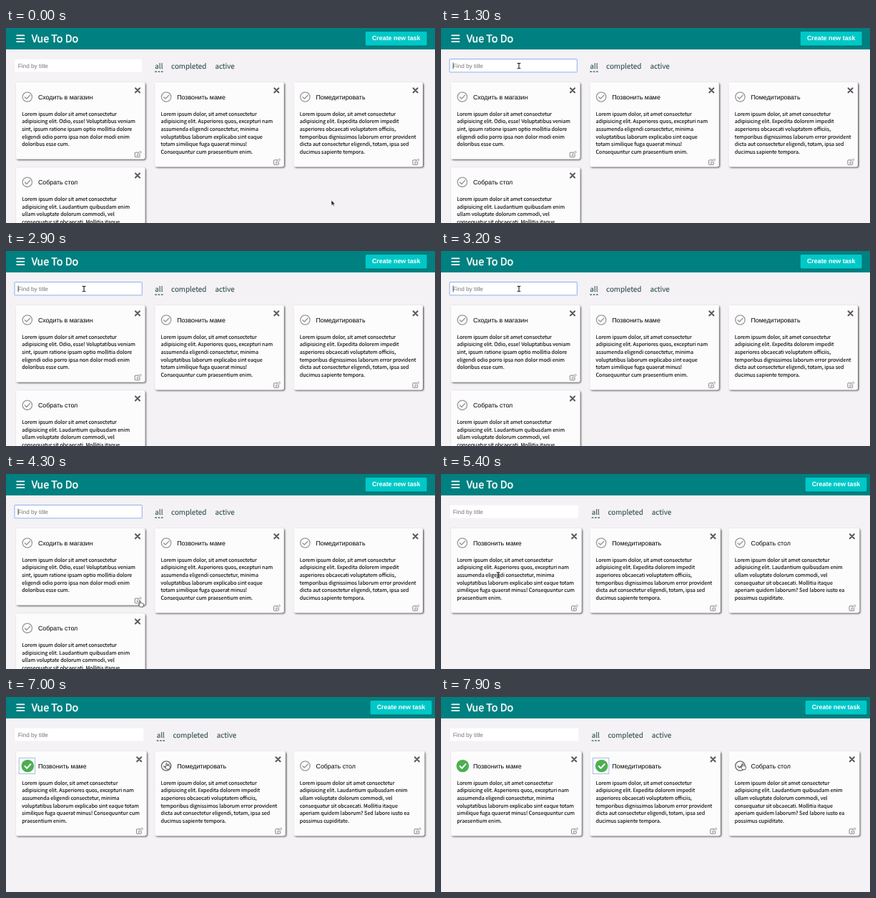
Animation of 600 by 273 pixels, one loop 8 s. Source, as an HTML page:

```html
<!DOCTYPE html>
<html lang="en">
<head>
<meta charset="utf-8">
<title>Vue To Do</title>
<style>
  html, body { margin: 0; width: 100%; height: 100%; overflow: hidden; background: #f4f2f5; }
  svg { display: block; width: 100vw; height: 100vh; }
  text { text-rendering: geometricPrecision; white-space: pre; }
  .brand, .tab, .body { font-family: "Noto Sans CJK SC", "Noto Sans CJK JP", "Noto Sans CJK", sans-serif; }
  .button, .field, .name { font-family: "Liberation Sans", Arial, sans-serif; }
  .brand { font-size: 14.3px; fill: #fff; stroke: #fff; stroke-width: .45; }
  .button { font-size: 8.9px; font-weight: 700; fill: #fff; text-anchor: middle; }
  .field { font-size: 8.25px; }
  .tab { font-size: 9.85px; fill: #2f4f4f; stroke: #2f4f4f; stroke-width: .1; }
  .name { font-size: 8.85px; fill: #000; }
  .body { font-size: 7.16px; fill: #000; stroke: #000; stroke-width: .1; }
  .line { fill: none; stroke-linecap: round; stroke-linejoin: round; }
</style>
</head>
<body>
<svg viewBox="0 0 600 273" xmlns="http://www.w3.org/2000/svg">
  <defs>
    <filter id="shadow" x="-10%" y="-10%" width="120%" height="125%">
      <feDropShadow dx="1.2" dy="1.2" stdDeviation="1.3" flood-color="#000" flood-opacity=".72"/>
    </filter>
    <filter id="soft" x="-10%" y="-20%" width="120%" height="150%">
      <feDropShadow dx="0" dy=".5" stdDeviation=".8" flood-color="#000" flood-opacity=".25"/>
    </filter>
  </defs>
  <rect width="600" height="273" fill="#f4f2f5"/>
  <rect width="600" height="30" fill="#008080"/>
  <path class="line" d="M15.2 10.4H25.4M15.2 14.8H25.4M15.2 19.2H25.4" stroke="#fff" stroke-width="1.8"/>
  <text class="brand" x="35.8" y="20">Vue To Do</text>
  <g id="page"></g>
  <g id="pointer"></g>
</svg>
<script>
const LOOP = 8000;
const page = document.getElementById('page');
const pointer = document.getElementById('pointer');

const tasks = {
  shop: {
    name: 'Сходить в магазин',
    lines: ['Lorem ipsum dolor sit amet consectetur', 'adipisicing elit. Odio, esse! Voluptatibus veniam',
      'sint, ipsum ratione ipsam optio mollitia dolore', 'eligendi odio porro ipsa non dolor modi enim',
      'doloribus esse cum.']
  },
  call: {
    name: 'Позвонить маме',
    lines: ['Lorem ipsum dolor, sit amet consectetur', 'adipisicing elit. Asperiores quos, excepturi nam',
      'assumenda eligendi consectetur, minima', 'voluptatibus laborum explicabo sint eaque',
      'totam similique fuga quaerat minus!', 'Consequuntur cum praesentium enim.'],
    wideTail: ['voluptatibus laborum explicabo sint eaque totam', 'similique fuga quaerat minus! Consequuntur cum',
      'praesentium enim.']
  },
  rest: {
    name: 'Помедитировать',
    lines: ['Lorem ipsum dolor, sit amet consectetur', 'adipisicing elit. Expedita dolorem impedit',
      'asperiores obcaecati voluptatem officiis,', 'temporibus dignissimos laborum error provident',
      'dicta aut consectetur eligendi, totam, ipsa sed', 'ducimus sapiente tempora.']
  },
  desk: {
    name: 'Собрать стол',
    lines: ['Lorem ipsum dolor sit amet consectetur', 'adipisicing elit. Laudantium quibusdam enim',
      'ullam voluptate dolorum commodi, vel', 'consequatur sit obcaecati. Mollitia itaque',
      'aperiam quidem laborum? Sed labore iusto ea', 'possimus cupiditate.']
  }
};

const all = ['shop', 'call', 'rest', 'desk'];
const found = ['call', 'rest'];
const left = ['call', 'rest', 'desk'];

// Each step changes part of the state from its time on.
const steps = [
  { at: 0, ids: all, query: '', focus: '', done: [], hover: '' },
  { at: 1200, focus: 'input' },
  { at: 1600, ids: found, query: 'п' },
  { at: 1900, query: 'по' },
  { at: 2600, query: 'п' },
  { at: 2800, ids: all, query: '' },
  { at: 4500, focus: '' },
  { at: 4800, ids: left },
  { at: 6000, hover: 'call' },
  { at: 6200, focus: 'call', done: ['call'] },
  { at: 6450, hover: '' },
  { at: 6950, hover: 'rest' },
  { at: 7100, focus: 'rest', done: ['call', 'rest'] },
  { at: 7350, hover: '' },
  { at: 7750, hover: 'desk' }
];

// Pointer stops: arrival, departure, place and shape.
const stops = [
  { from: 0, to: 250, x: 455, y: 241, kind: 'arrow' },
  { from: 1050, to: 3500, x: 109, y: 53, kind: 'beam' },
  { from: 4200, to: 4400, x: 187.5, y: 177.5, kind: 'hand' },
  { from: 4700, to: 4900, x: 184, y: 88, kind: 'hand' },
  { from: 5300, to: 5500, x: 80, y: 141.5, kind: 'beam' },
  { from: 6000, to: 6450, x: 30, y: 92, kind: 'hand' },
  { from: 6950, to: 7300, x: 224.5, y: 92.5, kind: 'hand' },
  { from: 7800, to: LOOP, x: 421.5, y: 93, kind: 'hand' }
];

const shapes = {
  arrow: '<path d="M0 0V7.4L1.8 5.9 3 8.5 4.2 7.9 3.1 5.4H5.3Z" fill="#222" stroke="#fff" stroke-width=".6"/>',
  beam: '<path class="line" d="M-1.8-3.6Q0-3.6 0-2.8 0-3.6 1.8-3.6M0-2.8V2.8M-1.8 3.6Q0 3.6 0 2.8 0 3.6 1.8 3.6" stroke="#222" stroke-width="1.1"/>',
  hand: '<path transform="scale(.9)" d="M-.7.6Q0-.5.8.6V3.6Q1.7 3 2.3 3.8 3.2 3.2 3.9 4.1 5.2 3.7 5.4 5V7.2L4.6 9.6H.2L-2.5 6.2Q-2.5 5-.7 6Z" fill="#fff" stroke="#222" stroke-width=".8" stroke-linejoin="round"/>'
};

const label = (cls, x, y, s, extra = '') => `<text class="${cls}" x="${x}" y="${y}" ${extra}>${s}</text>`;
const stroke = (d, color, width) => `<path class="line" d="${d}" stroke="${color}" stroke-width="${width}"/>`;

function checkIcon(x, y, isDone, isHover) {
  if (isDone) {
    return `<circle cx="${x + .5}" cy="${y}" r="8.8" fill="${isHover ? '#37803a' : '#4caf50'}"/>` +
      stroke(`M${x - 3.4} ${y + .4}l2.8 2.8 5.2-5.6`, '#fff', 2);
  }
  const color = isHover ? '#666' : '#999';
  return `<circle cx="${x}" cy="${y}" r="6.7" fill="none" stroke="${color}" stroke-width="1.3"/>` +
    stroke(`M${x - 3.4} ${y + .2}l2.4 2.4 4.6-4.8`, color, 1.4);
}

function editIcon(x, y) {
  return stroke(`M${x + .4} ${y - 2.8}h-4.1q-.8 0-.8.8v5q0 .8.8.8h5.2q.8 0 .8-.8v-2.2`, '#666', .8) +
    stroke(`M${x - 1.6} ${y + 1.6}l.3-1.7 4.5-4.4 1.4 1.4-4.5 4.4Z`, '#666', .7);
}

function card(id, index, wide, state) {
  const task = tasks[id];
  const x = 14 + 194.3 * (index % 3);
  const y = 76 + 119.3 * Math.floor(index / 3);
  const w = wide ? 182.6 : 180.4;
  const lines = wide && task.wideTail ? task.lines.slice(0, 3).concat(task.wideTail) : task.lines;
  const h = 54.2 + 10.67 * lines.length;
  const ring = state.focus === id
    ? `<rect x="${x + 4.2}" y="${y + 9.3}" width="22.4" height="22.2" fill="none" stroke="#9bb8de" stroke-width=".9"/>` : '';
  const cx = x + w - 10.4, cy = y + 11.3;
  return `<rect x="${x}" y="${y}" width="${w}" height="${h}" rx="2.5" fill="#fdfcfd" filter="url(#shadow)"/>` +
    checkIcon(x + 15.8, y + 20.5, state.done.includes(id), state.hover === id) + ring +
    label('name', x + 30.9, y + 24.1, task.name) +
    stroke(`M${cx - 3} ${cy - 3}l6 6m0-6l-6 6`, '#5a5a5a', 2.1) +
    lines.map((s, i) => label('body', x + 8.2, y + 46.8 + i * 10.67, s)).join('') +
    editIcon(x + w - 9.6, y + h - 6.6);
}

function toolbar(state, wide, caretOn) {
  const dx = wide ? 2.4 : 0;
  const bx = wide ? 509.6 : 502.8;
  const focused = state.focus === 'input';
  const right = 189.8 + dx;
  const caretX = 17 + 4.65 * state.query.length;
  return `<rect x="${bx}" y="5" width="85.8" height="19.4" rx="1.5" fill="#00c8c8" filter="url(#soft)"/>` +
    label('button', bx + 42.9, 17.4, 'Create new task') +
    `<rect x="12.5" y="43.8" width="${right - 12.5}" height="17.8" fill="#fff"/>` +
    (focused ? `<rect x="12" y="43.5" width="${right - 11.5}" height="18.4" rx=".6" fill="none" stroke="#8fb2ec" stroke-width="1"/>` : '') +
    label('field', 16.7, 55.6, state.query || 'Find by title', `fill="${state.query ? '#111' : '#757575'}"`) +
    (focused && caretOn ? `<path d="M${caretX} 48.4v9" stroke="#222" stroke-width=".7"/>` : '') +
    label('tab', 208.3 + dx, 56.7, 'all') +
    label('tab', 231.1 + dx, 56.7, 'completed') +
    label('tab', 292.4 + dx, 56.7, 'active') +
    `<path d="M${208.3 + dx} 61.2h11.4" stroke="#2f4f4f" stroke-width="1.2" stroke-dasharray="2.7 1.6"/>`;
}

function stateAt(t) {
  const state = {};
  for (const step of steps) if (step.at <= t) Object.assign(state, step);
  return state;
}

function pointerAt(t) {
  let i = 0;
  while (i < stops.length - 1 && stops[i + 1].from <= t) i++;
  const a = stops[i], b = stops[i + 1];
  if (!b || t <= a.to) return a;
  const p = (t - a.to) / (b.from - a.to);
  const e = p * p * (3 - 2 * p);
  const kind = e < .04 ? a.kind : e > .94 ? b.kind : 'arrow';
  return { x: a.x + (b.x - a.x) * e, y: a.y + (b.y - a.y) * e, kind };
}

let lastMarkup = '', lastKind = '';
function render(t) {
  const state = stateAt(t);
  const wide = state.ids.length < 4;
  const caretOn = Math.floor((t - state.at) / 530) % 2 === 0;
  const markup = toolbar(state, wide, caretOn) +
    state.ids.map((id, i) => card(id, i, wide, state)).join('');
  if (markup !== lastMarkup) page.innerHTML = lastMarkup = markup;

  const { x, y, kind } = pointerAt(t);
  if (kind !== lastKind) pointer.innerHTML = shapes[lastKind = kind];
  pointer.setAttribute('transform', `translate(${x} ${y})`);
}

function tick() {
  render(performance.now() % LOOP);
  requestAnimationFrame(tick);
}
tick();
</script>
</body>
</html>
```
